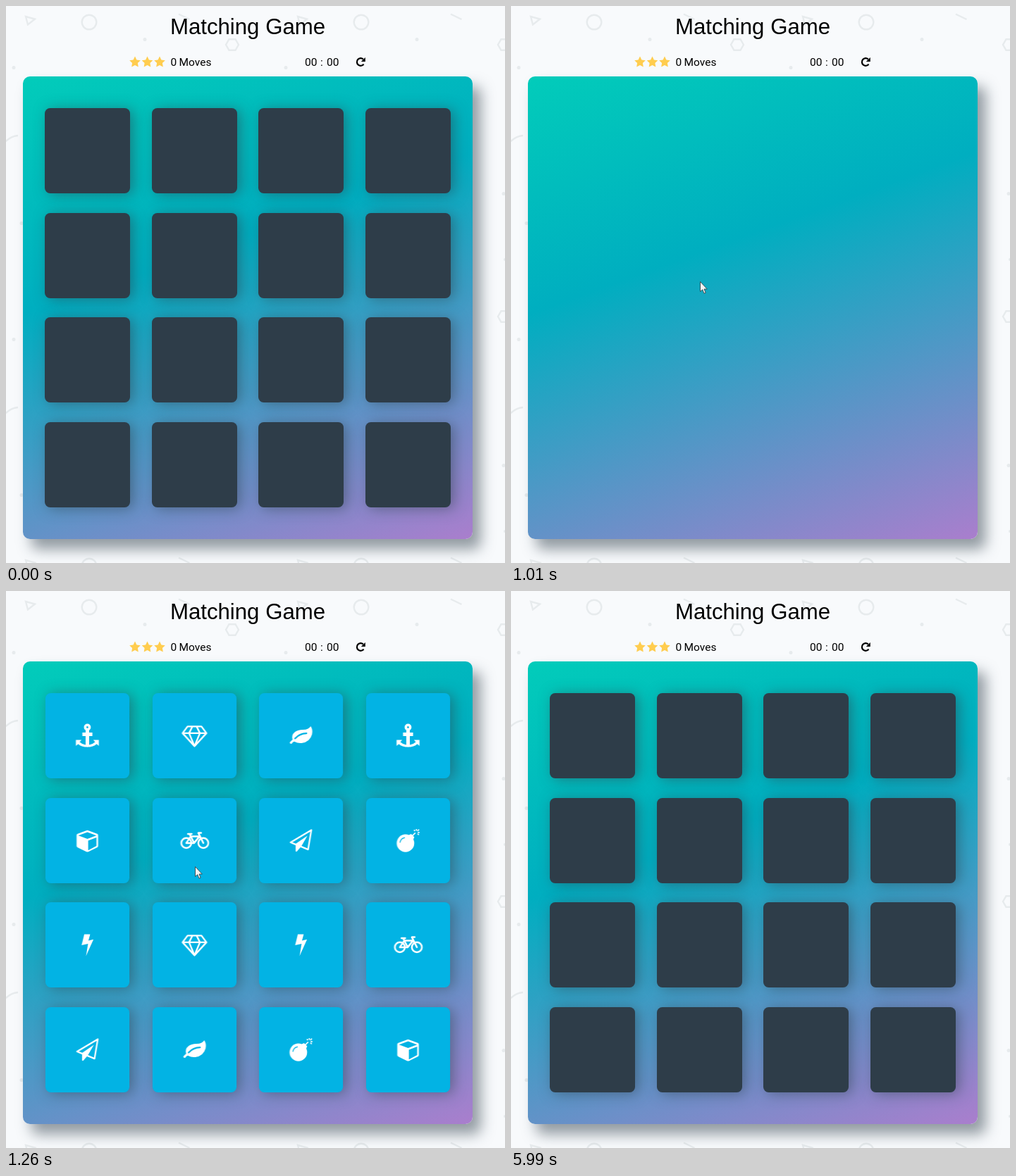
Animation, 708 px wide and 791 px high, one loop 6290 ms. Source, as an HTML page:

```html
<!DOCTYPE html>
<html lang="en">
<head>
<meta charset="utf-8">
<title>Matching Game</title>
<style>
  html, body { margin: 0; width: 100%; height: 100%; overflow: hidden; background: #f8fafc; }
  .stage { position: absolute; left: 0; top: 0; width: 708px; height: 791px; overflow: hidden; }
  .layer { position: absolute; left: 0; top: 0; }
  .title { font: 31.2px "Liberation Sans", Arial, sans-serif; text-anchor: middle; }
  .score { font: 15.5px Roboto, sans-serif; }

  .board {
    position: absolute; left: 24px; top: 100px; width: 638px; height: 657px;
    border-radius: 10px;
    background: linear-gradient(160deg, #02ccba 0%, #00aec0 38%, #aa7ecd 100%);
    box-shadow: 11.6px 14.5px 19.3px rgba(46, 61, 73, .5);
  }
  .card {
    position: absolute; width: 120.8px; height: 120.8px; border-radius: 7.7px;
    background: #2e3d49;
    box-shadow: 4.8px 1.9px 19.3px rgba(46, 61, 73, .5);
    animation: flip 6290ms step-end infinite;
  }
  .card svg { display: block; width: 100%; height: 100%; animation: peek 6290ms step-end infinite; }
  .hand { animation: point 6290ms step-end infinite; }
  .arrow { animation: wait 6290ms step-end infinite; }

  /* The flip swings past flat, then settles; it advances in visible steps. */
  @keyframes flip {
    0% { background: #2e3d49; opacity: 1; transform: rotateY(0deg); }
    16.057% { background: #02b3e4; opacity: 0; transform: rotateY(80deg); }
    17.488% { opacity: .3; transform: rotateY(28deg); }
    18.759% { opacity: .61; transform: rotateY(-20deg); }
    20.031% { opacity: 1; transform: rotateY(10deg); }
    21.303% { transform: rotateY(-4.6deg); }
    22.575% { transform: rotateY(-.6deg); }
    23.847% { transform: rotateY(0deg); }
    95.23%, 100% { background: #2e3d49; opacity: 1; transform: rotateY(0deg); }
  }
  @keyframes peek {
    0% { opacity: 0; }
    16.057% { opacity: 1; }
    95.23%, 100% { opacity: 0; }
  }
  @keyframes point {
    0% { opacity: 0; transform: translate(139px, 263px); }
    12.4% { opacity: 1; transform: translate(139px, 263px); }
    13.672% { opacity: 1; transform: translate(263.5px, 390.5px); }
    16.057%, 100% { opacity: 0; transform: translate(263.5px, 390.5px); }
  }
  @keyframes wait {
    0% { opacity: 0; }
    16.057% { opacity: 1; }
    49.602%, 100% { opacity: 0; }
  }
</style>
</head>
<body>
<div class="stage">
  <svg class="layer" width="708" height="791">
    <defs>
      <pattern id="doodles" width="386" height="386" patternUnits="userSpaceOnUse">
        <g fill="none" stroke="#e7ebed" stroke-width="2.4">
          <path d="M28 15L41 18.5 31 26.5z"/>
          <circle cx="118" cy="23" r="10.3"/>
          <path d="M316.5 47.2h9l4.5 7.8-4.5 7.8h-9L312 55z"/>
          <path d="M245 11.5L260.500 19M-2 194Q6 185 17 184"/>
        </g>
        <g fill="#e7ebed">
          <circle cx="197" cy="47.500" r="2.500"/>
          <circle cx="11" cy="87.500" r="2.500"/>
          <circle cx="320" cy="266.500" r="2.500"/>
          <circle cx="22" cy="308.500" r="2.500"/>
          <circle cx="322" cy="360" r="2"/>
        </g>
      </pattern>

      <g id="anchor">
        <circle cy="-11.9" r="3.2" fill="none" stroke="#fff" stroke-width="3.600"/>
        <path id="anchorHalf" d="M.5-8V16.200Q-9 16.200-13.200 11.800L-16.500 14.500V6H-8.500L-11.100 9.200Q-8 12.300-2.500 13V.7H-7.200V-4.400H-2.500V-8z"/>
        <use href="#anchorHalf" transform="scale(-1 1)"/>
      </g>
      <g id="diamond" fill="none" stroke="#fff" stroke-width="2.400" stroke-linejoin="round">
        <path d="M-10-13H10L17.200-3.500 0 15-17.200-3.500zM-17-3.500H17M-3-13L-7.800-3.500 0 15 7.800-3.500 3-13"/>
      </g>
      <g id="leaf">
        <path d="M14-13.500Q17.500-9 16-2 13 9 1 10.500-5 11-9 8.500-11 8-13 11-14.500 12.500-16 10.500-16.500 9-12 5.500-14-1-9-5-5-8.500 3-8.500 11-8.500 14-13.500z"/>
        <path d="M-8.500 4Q-2-3 8-3.300" fill="none" stroke="#02b3e4" stroke-width="2.200" stroke-linecap="round"/>
      </g>
      <g id="cube">
        <path fill-rule="evenodd" d="M-1-14.500Q0-15 1-14.500L14-9.600Q15.500-9 15.500-7.500V7.500Q15.500 9 14 9.800L1 16Q0 16.400-1 16L-14 9.800Q-15.500 9-15.500 7.500V-7.500Q-15.500-9-14-9.600zM0-11.900L-13-7.100 0-2.300 13-7.100zM1.200.2V13.800L13.100 7.700V-4.300z"/>
      </g>
      <g id="bike" fill="none" stroke="#fff" stroke-width="2.500" stroke-linejoin="round" stroke-linecap="round">
        <circle cx="-11.800" cy="3.500" r="7.200"/>
        <circle cx="12.700" cy="3.500" r="7.200"/>
        <path d="M-11.800 3.500L-5.500-5.800H7L-.5 3.500H-11.800M-.5 3.500L-7-9M-9.500-9.300H-4M12.700 3.500L5.500-10.800H9.500"/>
      </g>
      <g id="plane">
        <path d="M15-15L-14.800 2.600-6.500 6 0 8.500 10.300 12.700z" fill="none" stroke="#fff" stroke-width="2.300" stroke-linejoin="round"/>
        <path d="M-7.600 4.700L9.400-7 .6 8-5.500 15.200Q-7 16.500-7.600 15z"/>
      </g>
      <g id="bomb">
        <circle cx="-3.700" cy="3.800" r="12.600"/>
        <path d="M1-8L4.500-9.500 9-5 7.500-1.500z"/>
        <path d="M6-6.500L10.500-11M12-16.500V-14M8.500-15L10-13.500M16.500-11.500H14M15.500-8L13.800-9.800M15.800-15.800L13.500-13.500" fill="none" stroke="#fff" stroke-width="1.600"/>
        <path d="M-11.500 2.500Q-10.500-3-5-4" fill="none" stroke="#02b3e4" stroke-width="1.300" stroke-linecap="round"/>
      </g>
      <g id="bolt">
        <path d="M-4.500-14.800H4L1.500-6 8.800-7.600-2 16 1-1.500-8.300.6z"/>
      </g>
      <path id="star" fill="#ffcd4f" d="M0-8L2.400-3 7.800-2.200 3.900 1.600 4.800 7 0 4.400-4.800 7-3.900 1.600-7.800-2.200-2.400-3z"/>
    </defs>

    <rect width="708" height="791" fill="url(#doodles)"/>
    <text class="title" x="343" y="39.500">Matching Game</text>
    <use href="#star" x="183" y="79.500"/>
    <use href="#star" x="200.500" y="79.500"/>
    <use href="#star" x="218" y="79.500"/>
    <g class="score">
      <text x="233.500" y="85">0</text>
      <text x="245.500" y="85">Moves</text>
      <text x="424" y="85">00</text>
      <text x="446" y="85">:</text>
      <text x="455" y="85">00</text>
    </g>
    <path d="M506.800 75.600A5.300 5.300 0 1 0 507.500 82.600" fill="none" stroke="#000" stroke-width="2.200"/>
    <path d="M509.800 73V79H503.800z"/>
  </svg>

  <div class="board"></div>
  <div id="cards"></div>

  <svg class="layer" width="708" height="791">
    <path class="hand" fill="#fff" stroke="#111" stroke-width=".9" d="M3.500 2A1.600 1.600 0 0 1 6.700 2V7.500L12.700 8.700Q15 9.300 15 11.700V15.200L13 19V21.800H5.500V19L1 13.500Q-.2 11.500 1.500 10.900 2.500 10.700 3.500 12z"/>
    <path class="arrow" fill="#f2f5f6" stroke="#39484c" stroke-width=".9" stroke-linejoin="round" d="M268.500 391.500V405.500L271.700 402.700 274 408.200 276.200 407.200 274 402H278.300z"/>
  </svg>
</div>
<script>
  const deck = `anchor diamond leaf anchor
    cube bike plane bomb
    bolt diamond bolt bike
    plane leaf bomb cube`.split(/\s+/);

  document.getElementById('cards').innerHTML = deck.map((icon, i) => {
    const x = 55 + (i % 4) * 151.7;
    const y = 144.8 + Math.floor(i / 4) * 148.7;
    return `<div class="card" style="left:${x}px;top:${y}px">
      <svg viewBox="-60.4 -60.4 120.8 120.8" fill="#fff"><use href="#${icon}"/></svg></div>`;
  }).join('');
</script>
</body>
</html>
```
